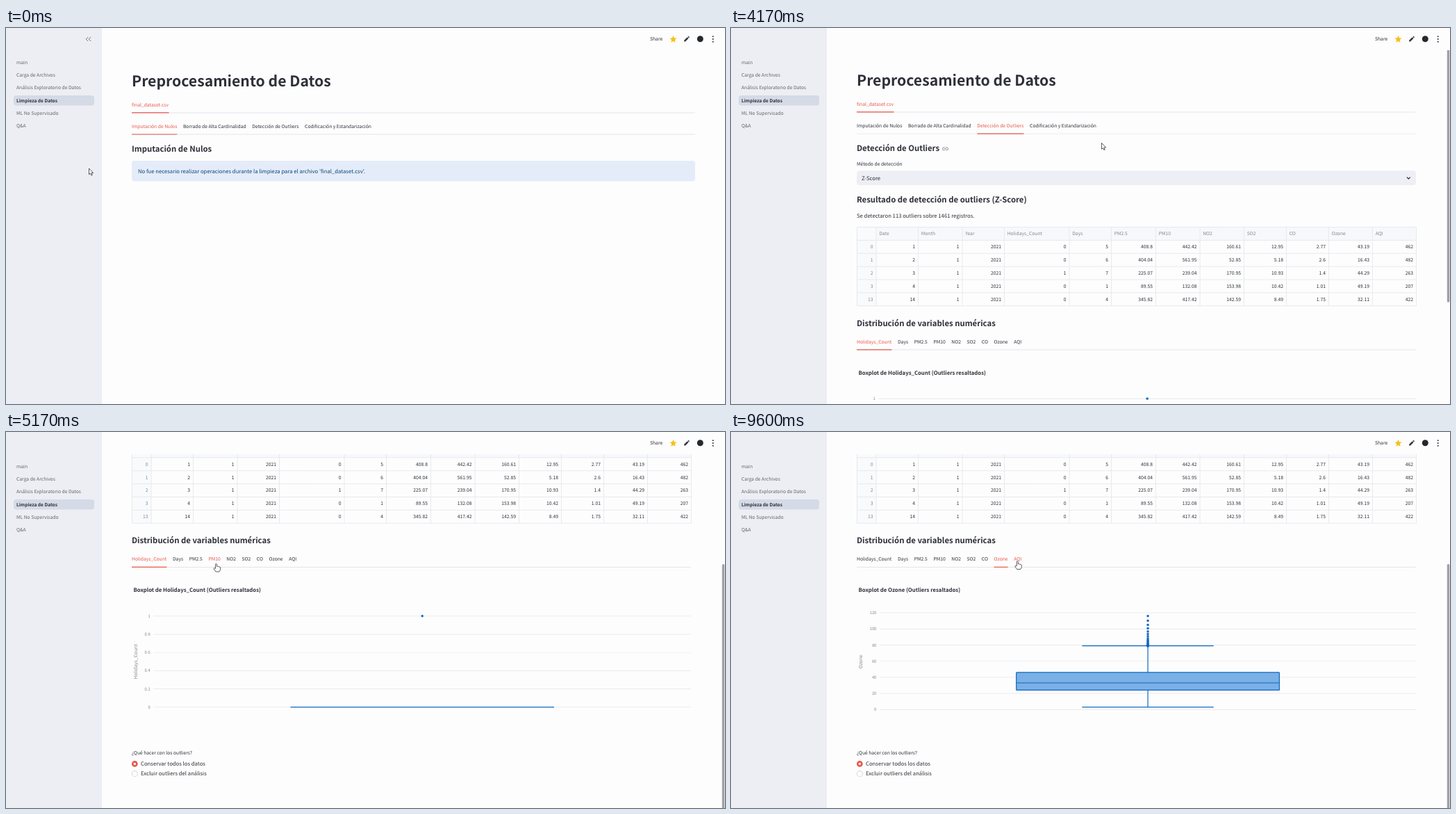
These frames come from a looping animation (1035x541 px, 9630 ms). An HTML page with a canvas:

```html
<!DOCTYPE html>
<html lang="es">
<head>
<meta charset="utf-8">
<title>Preprocesamiento de Datos</title>
<style>
html, body { margin: 0; width: 100%; height: 100%; overflow: hidden; background: #fdfdfd; }
canvas { display: block; }
</style>
</head>
<body>
<canvas id="stage" width="1035" height="541"></canvas>
<script>
const ctx = document.getElementById('stage').getContext('2d');
ctx.textRendering = 'geometricPrecision';

const LOOP = 9630, LEFT = 181, TAB_GAP = 8.6;
const SMALL = 6.76, BODY = 7.72, TICK = 5.8;
const FAMILY = '"Noto Sans CJK JP", "Noto Sans CJK SC", "Noto Sans CJK", "Open Sans", sans-serif';
const PAGE = '#fdfdfd', INK = '#2e3039', GRAY = '#85878f', RED = '#e8574b', BLUE = '#0f6abd', RULE = '#e4e5eb';

const NAV = ['main', 'Carga de Archivos', 'Análisis Exploratorio de Datos', 'Limpieza de Datos', 'ML No Supervisado', 'Q&A'];
const SECTIONS = tabGroup(
  ['Imputación de Nulos', 'Borrado de Alta Cardinalidad', 'Detección de Outliers', 'Codificación y Estandarización'],
  i => [0, 960, 2545, Infinity][i]
);
const VARIABLES = tabGroup(
  ['Holidays_Count', 'Days', 'PM2.5', 'PM10', 'NO2', 'SO2', 'CO', 'Ozone', 'AQI'],
  i => i && 7160 + (i - 3) * 530
);

// minimum, quartiles and maximum of each variable
const skewed = max => [.01, .06, .09, .14, 1].map(share => share * max);
const SUMMARY = {
  Holidays_Count: [0, 0, 0, 0, 1],
  Days: [1, 2, 4, 6, 7],
  'PM2.5': skewed(1000),
  PM10: [7, 112, 200, 298, 1000],
  NO2: skewed(433),
  SO2: skewed(113),
  CO: skewed(4.7),
  Ozone: [3, 24, 33, 46, 116]
};

const COLUMNS = [181.5, 209, 269.5, 333, 393.5, 487, 547.5, 611.5, 675, 738.5, 799.5, 860.5, 923.5, 986.5];
const TABLE = [
  ' Date Month Year Holidays_Count Days PM2.5 PM10 NO2 SO2 CO Ozone AQI',
  '0 1 1 2021 0 5 408.8 442.42 160.61 12.95 2.77 43.19 462',
  '1 2 1 2021 0 6 404.04 561.95 52.85 5.18 2.6 16.43 482',
  '2 3 1 2021 1 7 225.07 239.04 170.95 10.93 1.4 44.29 263',
  '3 4 1 2021 0 1 89.55 132.08 153.98 10.42 1.01 49.19 207',
  '13 14 1 2021 0 4 345.82 417.42 142.59 8.49 1.75 32.11 422'
].map(row => row.split(' '));

// pointer arrivals: time, x, y; then one shortly before each variable is clicked
const STOPS = [
  [0, 119.5, 202], [700, 305, 141], [2400, 374, 139], [4100, 533.5, 165.5], [4530, 531.5, 160], [5170, 302.5, 189],
  ...VARIABLES.tabs.slice(1).map(tab => [tab.click - 180, tab.x + tab.width / 2, 185.5])
];

const ARROW = new Path2D('M0 0V8.8L2 7L3.4 10.1L4.8 9.5L3.5 6.5H6.2Z');
const HAND = new Path2D('M-1 7V1Q0-.6 1 1V4.5Q2 3.6 2.8 4.8Q3.9 4.1 4.6 5.2Q5.8 4.8 6 6V8.5Q5.8 10.5 4.6 12H-.6Q-2.4 9.6-3.6 7.6Q-3.2 6-1 7.4Z');
const STAR = new Path2D('M0-5L1.5-1.7L5-1.3L2.4 1.1L3.1 4.7L0 2.9L-3.1 4.7L-2.4 1.1L-5-1.3L-1.5-1.7Z');
const PENCIL = new Path2D('M-3.5 3.5V1.8L1 -2.7L2.7 -1L-1.8 3.5ZM1.6-3.3L2.4-4Q2.8-4.2 3.1-3.9L4-3Q4.2-2.7 4-2.4L3.3-1.6Z');
const LINK = new Path2D('M3.8-1.5H2.5A2 2 0 0 0 2.5 2.5H3.8M5.2-1.5H6.5A2 2 0 0 1 6.5 2.5H5.2M2.8 .5H6.2');

let now = 0, scroll = 0, right = 992, mouse = { x: 0, y: 0 };

const mix = (a, b, p) => a + (b - a) * p;
const smooth = p => (p = Math.min(1, Math.max(0, p)), p * p * (3 - 2 * p));

function setFont(size, weight = 400) {
  ctx.font = `${weight} ${size}px ${FAMILY}`;
}

function tabGroup(labels, clickTime) {
  setFont(SMALL);
  let x = LEFT;
  const tabs = labels.map((label, i) => {
    const tab = { label, x, width: ctx.measureText(label).width, click: clickTime(i) };
    x += tab.width + TAB_GAP;
    return tab;
  });
  return { tabs, current: () => tabs.filter(tab => tab.click <= now).length - 1 };
}

// rest at a stop, then glide so as to arrive at the next one on time
function pointerAt(t) {
  const i = STOPS.findIndex(stop => stop[0] > t);
  if (i < 0) return { x: STOPS.at(-1)[1], y: STOPS.at(-1)[2] };
  const [t0, x0, y0] = STOPS[i - 1], [t1, x1, y1] = STOPS[i];
  const glide = Math.min(650, (t1 - t0) * .66);
  const p = smooth(1 - (t1 - t) / glide);
  return { x: mix(x0, x1, p), y: mix(y0, y1, p) };
}

// y is the optical middle of the line
function text(str, x, y, size = SMALL, color = INK, align = 'left', weight = 400) {
  setFont(size, weight);
  ctx.textAlign = align;
  ctx.fillStyle = color;
  ctx.fillText(str, x, y + size * .35);
}

function rect(x, y, w, h, color, radius = 0) {
  ctx.fillStyle = color;
  ctx.beginPath();
  ctx.roundRect(x, y, w, h, radius);
  ctx.fill();
}

function dot(x, y, r, color) {
  ctx.fillStyle = color;
  ctx.beginPath();
  ctx.arc(x, y, r, 0, 7);
  ctx.fill();
}

// several polylines in one stroke
function lines(polylines, color, width) {
  ctx.strokeStyle = color;
  ctx.lineWidth = width;
  ctx.beginPath();
  polylines.forEach(points => points.forEach(([x, y], i) => i ? ctx.lineTo(x, y) : ctx.moveTo(x, y)));
  ctx.stroke();
}

function shape(path, x, y, fill, stroke) {
  ctx.save();
  ctx.translate(x, y);
  ctx.lineWidth = .8;
  if (fill) ctx.fillStyle = fill, ctx.fill(path);
  if (stroke) ctx.strokeStyle = stroke, ctx.stroke(path);
  ctx.restore();
}

function heading(str, y) {
  text(str, LEFT, y, 11.35, INK, 'left', 600);
  const hover = mouse.x > LEFT && Math.abs(mouse.y + scroll - y) < 11;
  if (hover) shape(LINK, LEFT + ctx.measureText(str).width + 4, y, null, '#6f717b');
}

function underline(y, x, width) {
  rect(LEFT, y - .1, right - LEFT, .9, RULE);
  rect(x, y - .3, width, 1.2, RED);
}

// returns whether the pointer is over one of the tabs
function tabBar({ tabs, current }, y) {
  const index = current(), to = tabs[index], from = tabs[Math.max(0, index - 1)];
  const p = smooth((now - to.click) / 300);
  const inRow = Math.abs(mouse.y + scroll - y) < 11.5;
  const hover = inRow && tabs.find(tab => mouse.x >= tab.x && mouse.x <= tab.x + tab.width);
  underline(y + 11, mix(from.x, to.x, p), mix(from.width, to.width, p));
  tabs.forEach(tab => text(tab.label, tab.x, y, SMALL, tab === to || tab === hover ? RED : INK));
  return Boolean(hover);
}

function emptySection(title) {
  heading(title, 174.2);
  rect(LEFT, 191, right - LEFT, 29.6, '#e5ecf9', 4);
  text("No fue necesario realizar operaciones durante la limpieza para el archivo 'final_dataset.csv'.", 190, 205.8, BODY, '#0b4775');
}

function table(top) {
  const rowHeight = 18.87, bottom = top + rowHeight * TABLE.length;
  const [x0, x1] = [COLUMNS[0], COLUMNS.at(-1)];
  rect(x0, top, x1 - x0, rowHeight, '#f7f8fb');
  rect(x0, top, COLUMNS[1] - x0, bottom - top, '#f9fafc');
  const rows = [...TABLE, null].map((_, i) => top + i * rowHeight);
  lines([...COLUMNS.map(x => [[x, top], [x, bottom]]), ...rows.map(y => [[x0, y], [x1, y]])], RULE, .8);
  TABLE.forEach((row, i) => row.forEach((cell, j) => {
    const y = rows[i] + rowHeight / 2;
    if (i) text(cell, COLUMNS[j + 1] - 4.6, y, SMALL, j ? INK : GRAY, 'right');
    else text(cell, COLUMNS[j] + 4.2, y, SMALL, GRAY);
  }));
}

function tickStep(max) {
  const raw = max / 5, unit = 10 ** Math.floor(Math.log10(raw));
  return unit * [5, 2, 1].find(n => n * unit <= raw * 1.001);
}

function boxplot(name) {
  const [min, q1, median, q3, max] = SUMMARY[name];
  const spread = q3 - q1, high = Math.min(max, q3 + 1.5 * spread) * (spread > 0);
  const pad = (max - min) * .055, step = tickStep(max);
  const yOf = v => 665.3 - 131 * (v - min) / (max - min);
  const ticks = [];
  for (let k = Math.ceil((min - pad) / step); k * step <= max + pad; k++) ticks.push(String(+(k * step).toFixed(1)));
  setFont(TICK);
  const x0 = 204 + Math.max(...ticks.map(s => ctx.measureText(s).width)) * 1.05;
  const width = 986 - x0, mid = x0 + width / 2, half = width * .2453;

  text(`Boxplot de ${name} (Outliers resaltados)`, 183.5, 497, 7.76, INK, 'left', 600);
  ticks.forEach(s => {
    rect(x0, yOf(+s) - .3, width, .7, '#e3e5ee');
    text(s, x0 - 4.8, yOf(+s), TICK, GRAY, 'right');
  });
  ctx.save();
  ctx.translate(186.3, 600);
  ctx.rotate(-Math.PI / 2);
  text(name, 0, 0, SMALL, GRAY, 'center');
  ctx.restore();

  rect(mid - half, yOf(q3), half * 2, yOf(q1) - yOf(q3), '#7ab0e6');
  const across = (v, reach) => [[mid - reach, yOf(v)], [mid + reach, yOf(v)]];
  const upright = (x, a, b) => [[x, yOf(a)], [x, yOf(b)]];
  lines([
    ...[q1, median, q3].map(v => across(v, half)),
    ...[min, high].map(v => across(v, half / 2)),
    ...[mid - half, mid + half].map(x => upright(x, q1, q3)),
    upright(mid, min, q1), upright(mid, q3, high)
  ], BLUE, 1.2);

  // outliers thin out towards the maximum
  const count = spread ? 24 : 1;
  for (let i = 1; i <= count && high < max; i++) dot(mid, yOf(mix(high, max, (i / count) ** 4)), 1.75, BLUE);
}

function radio(label, y, checked) {
  dot(185.3, y, 4.4, checked ? RED : '#c6c8d0');
  dot(185.3, y, checked ? 1.7 : 3.7, PAGE);
  text(label, 194, y, BODY);
}

function outlierSection() {
  heading('Detección de Outliers', 174.2);
  text('Método de detección', LEFT, 196.6);
  rect(LEFT, 206.3, 805, 20.8, '#eeeff5', 4);
  text('Z-Score', 188, 216.8, BODY);
  lines([[[972.8, 215.6], [975.3, 218], [977.8, 215.6]]], INK, 1.2);
  heading('Resultado de detección de outliers (Z-Score)', 248.2);
  text('Se detectaron 113 outliers sobre 1461 registros.', LEFT, 271.2, BODY);
  table(287.5);
  heading('Distribución de variables numéricas', 425.9);
  const hover = tabBar(VARIABLES, 452.6);
  boxplot(VARIABLES.tabs[VARIABLES.current()].label);
  text('¿Qué hacer con los outliers?', LEFT, 730.7);
  radio('Conservar todos los datos', 747, true);
  radio('Excluir outliers del análisis', 761.2, false);
  return hover;
}

function sidebar() {
  rect(0, 0, 138, 541, '#edeef4');
  rect(11, 97, 116, 14.6, '#d5dae7', 4);
  NAV.forEach((label, i) => {
    const y = 49.3 + i * 18.33;
    if (label === 'Limpieza de Datos') text(label, 15, y, 6.6, INK, 'left', 600);
    else text(label, 15, y, SMALL, '#61636d');
  });
  if (mouse.x < 138) lines([115.2, 119.2].map(x => [[x + 3, 13], [x, 16], [x + 3, 19]]), '#74767f', 1);
}

function toolbar() {
  rect(138, 0, 897, 32, PAGE);
  text('Share', 927, 16);
  shape(STAR, 960.5, 16, '#f5c21b');
  shape(PENCIL, 979.7, 16, INK);
  dot(999.3, 15.8, 4.5, '#24292e');
  for (let i = -1; i <= 1; i++) dot(1017.7, 16 + i * 3.8, 1, INK);
}

function draw(t) {
  now = t;
  mouse = pointerAt(t);
  scroll = 269.5 * smooth((t - 4150) / 606);
  const section = SECTIONS.current();
  right = section ? 986 : 992;

  rect(0, 0, 1035, 541, PAGE);
  ctx.save();
  ctx.translate(0, -scroll);
  text('Preprocesamiento de Datos', LEFT, 76.8, 21.2, INK, 'left', 700);
  text('final_dataset.csv', LEFT, 110.6, SMALL, RED);
  underline(121.6, LEFT, 53.5);
  let overTab = tabBar(SECTIONS, 141.7);
  if (section < 2) emptySection(SECTIONS.tabs[section].label);
  else overTab = outlierSection() || overTab;
  ctx.restore();

  if (section) rect(1030.8, scroll * .705, 3.5, 394 - scroll * .02, '#a0a0a5', 2);
  toolbar();
  sidebar();
  shape(overTab ? HAND : ARROW, mouse.x, mouse.y, '#fff', '#333');
}

(function frame() {
  draw(performance.now() % LOOP);
  requestAnimationFrame(frame);
})();
</script>
</body>
</html>
```
